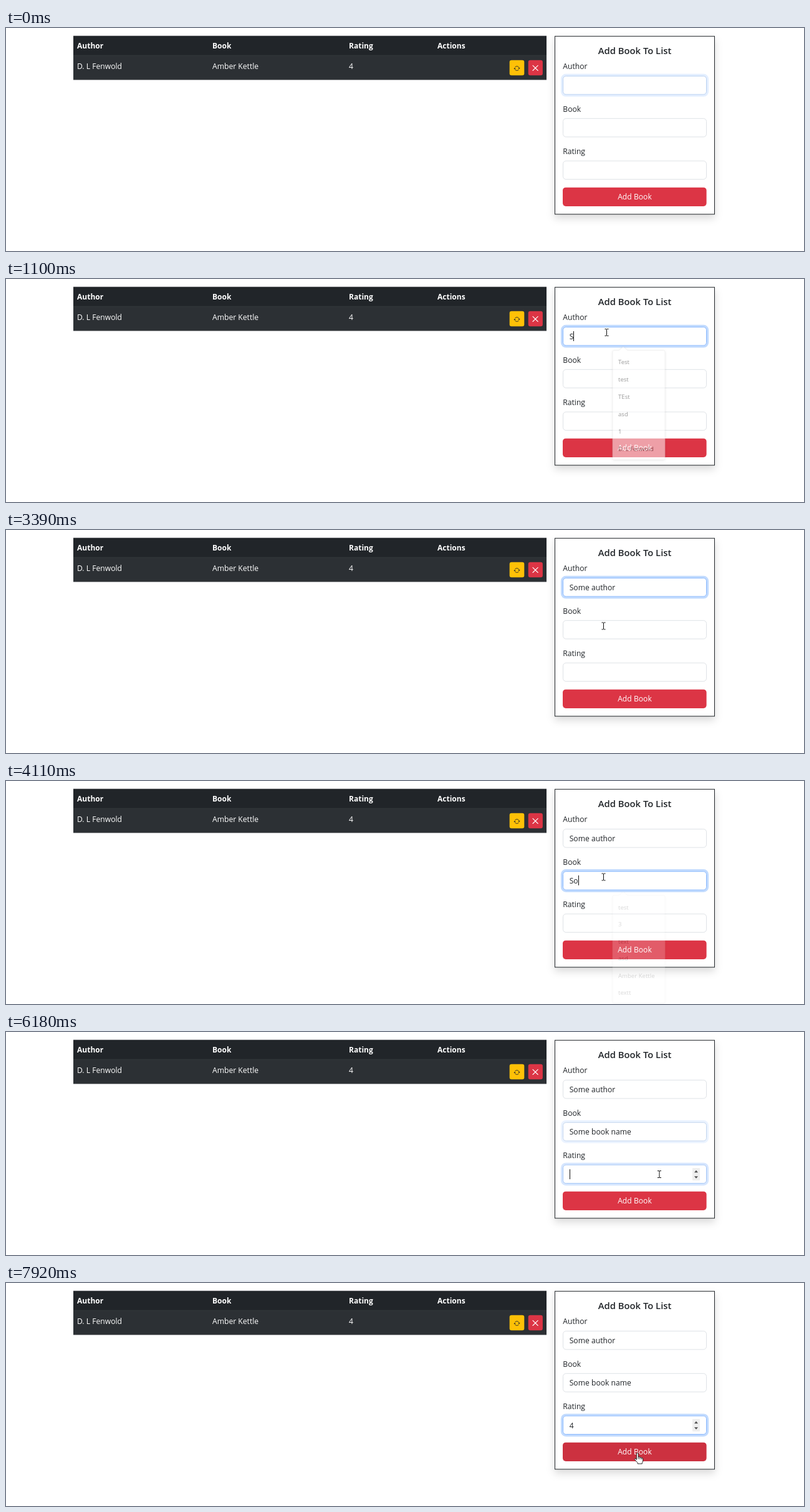
An HTML page for the animation above (7.99 s loop, 1280x359 px).

```html
<!DOCTYPE html>
<html lang="en">
<head>
<meta charset="utf-8">
<title>Book list</title>
<style>
  html, body { margin: 0; width: 100%; height: 100%; overflow: hidden; background: #fff; }
  svg { display: block; width: 100%; height: 100%; }
  text { font: 12.15px "Open Sans", "Noto Sans", sans-serif; fill: #212529; white-space: pre; }
  .table text, .btn-text { fill: #fff; }
  .table .head { font-weight: 700; font-size: 12px; }
  .title { font-weight: 600; font-size: 14.8px; }
  .middle { text-anchor: middle; }
  .card { fill: #fff; stroke: #212529; filter: drop-shadow(0 6.4px 6.4px rgba(0, 0, 0, .15)); }
  .ring { fill: none; stroke: #c2dbfe; stroke-width: 3.4; }
  .box { fill: #fff; }
  .popup text { font-size: 9.6px; fill: #444; }
  .popup path { fill: #fff; stroke: #ddd; stroke-width: .7; filter: drop-shadow(0 1px 2px rgba(0, 0, 0, .14)); }
</style>
</head>
<body>
<svg id="stage" viewBox="0 0 1280 359" xmlns="http://www.w3.org/2000/svg">
  <g class="table">
    <rect x="108" y="12.6" width="759" height="70.6" fill="#212529"/>
    <rect x="108" y="44" width="759" height="39.2" fill="#2c3034"/>
    <path d="M108 44.2H867M108 82.9H867" stroke="#373b3e" stroke-width=".8"/>
    <text class="head" x="114" y="33">Author</text>
    <text class="head" x="331" y="33">Book</text>
    <text class="head" x="550" y="33">Rating</text>
    <text class="head" x="692" y="33">Actions</text>
    <text x="114" y="66">D. L Fenwold</text>
    <text x="331" y="66">Amber Kettle</text>
    <text x="550" y="66">4</text>
    <rect x="807.7" y="51.7" width="23.6" height="24.6" rx="3.2" fill="#ffc107"/>
    <g fill="none" stroke="#212529" stroke-width=".9">
      <path d="M816.4 63.4a3.5 3.5 0 0 1 6.2 0M822.6 66.6a3.5 3.5 0 0 1-6.2 0"/>
    </g>
    <path d="M821.3 64h3.4l-1.7 2zM814.3 66h3.4l-1.7-2z" fill="#212529"/>
    <rect x="837.7" y="51.7" width="23.2" height="24.6" rx="3.2" fill="#dc3545"/>
    <path d="M845 60.3l8.2 8.2m0-8.2l-8.2 8.2" stroke="#fff" stroke-width="1.1" stroke-linecap="round"/>
  </g>

  <rect class="card" x="880.5" y="13.3" width="256" height="286.5"/>
  <text class="title middle" x="1008.5" y="42">Add Book To List</text>
  <g id="fields"></g>
  <g id="spinner">
    <rect x="1101" y="219" width="12" height="20" rx="1" fill="#efefef"/>
    <rect id="pressed" x="1101" y="219" width="12" height="11" fill="#777"/>
    <path d="M1104 226.2h6l-3-3.6zM1104 232.2h6l-3 3.6z" fill="#505050"/>
  </g>
  <rect id="button" x="893" y="256.7" width="230.6" height="30.2" rx="4.8"/>
  <text class="btn-text middle" x="1008.5" y="276.4">Add Book</text>
  <rect id="caret" width="1" height="16" fill="#111"/>
  <g id="popups"></g>

  <circle id="click" r="9.5" fill="#f8e800" fill-opacity=".62"/>
  <g id="cursor">
    <g id="beam" fill="none">
      <path d="M-3-5.5h2.2L0-5 .8-5.5H3M0-5V5M-3 5.5h2.2L0 5l.8.5H3" stroke="#fff" stroke-width="2.2" stroke-opacity=".7"/>
      <path d="M-3-5.5h2.2L0-5 .8-5.5H3M0-5V5M-3 5.5h2.2L0 5l.8.5H3" stroke="#111"/>
    </g>
    <path id="arrow" d="M.5.5v12.2l2.8-2.6 1.9 4.4 2-.9-1.9-4.2h3.9z" fill="#fff" stroke="#111" stroke-width=".9"/>
    <g id="hand" stroke="#111" stroke-width=".9" stroke-linejoin="round">
      <path d="M-1.4 9V1q0-1.4 1.4-1.4T1.4 1v5q2.6-.8 2.7.8 2.4-.7 2.6.9 2.2-.5 2.2 1.3v3.2q0 2-1.3 3.3V17H.4v-1.6L-4 10.7q-1.2-1.5.1-2 1.1-.4 2.5 1.7z" fill="#fff"/>
      <path d="M1.4 6v3.5M4.1 6.8v3M6.7 7.7v2.2" fill="none"/>
    </g>
  </g>
</svg>
<script>
const LOOP = 7990, FADE = 150;
const $ = id => document.getElementById(id);
const clamp = v => Math.max(0, Math.min(1, v));
const ramp = (t, start) => clamp((t - start) / FADE);
const mix = (a, b, k) => `rgb(${a.map((v, i) => Math.round(v + (b[i] - v) * k))})`;
const show = (el, on) => el.style.display = on ? '' : 'none';

function add(parent, tag, attrs, content = '') {
  const el = document.createElementNS('http://www.w3.org/2000/svg', tag);
  for (const name in attrs) el.setAttribute(name, attrs[name]);
  el.textContent = content;
  return parent.appendChild(el);
}

// keys: the moment at which each further character of the text appears
const fields = [
  { label: 'Author', y: 77.4, focus: 600, blur: 3460, text: 'Some author',
    keys: [1030, 1300, 1440, 1510, 1780, 1850, 1970, 2230, 2320, 2500, 2640] },
  { label: 'Book', y: 145.7, focus: 3460, blur: 6080, text: 'Some book name',
    keys: [3990, 4100, 4200, 4290, 4380, 4520, 4620, 4720, 4830, 4930, 5030, 5130, 5230, 5320] },
  { label: 'Rating', y: 214, focus: 6080, blur: Infinity, counter: true,
    keys: [6900, 7110, 7290, 7410] }
];

for (const f of fields) {
  const frame = { x: 893.5, y: f.y, width: 230, height: 29.6, rx: 4.8 };
  add($('fields'), 'text', { x: 893.3, y: f.y - 11.2 }, f.label);
  f.ring = add($('fields'), 'rect',
    { class: 'ring', x: 891.6, y: f.y - 1.9, width: 233.8, height: 33.4, rx: 6.6 });
  f.box = add($('fields'), 'rect', { class: 'box', ...frame });
  f.value = add($('fields'), 'text', { x: 903.7, y: f.y + 19.6 });
}

const popups = [
  { top: 115, step: 28, open: 680, close: 1030,
    items: ['Test', 'test', 'TEst', 'asd', '1', 'D. L Fenwold'] },
  { top: 184.3, step: 27.5, open: 3540, close: 3990,
    items: ['test', '3', 'text', 'asd', 'Amber Kettle', 'textt'] }
];

for (const p of popups) {
  p.el = add($('popups'), 'g', { class: 'popup' });
  add(p.el, 'path', { d: `M975 ${p.top}h8l7-6 7 6h58q2 0 2 2v${p.step * 6 + 4}q0 2-2 2h-80q-2 0-2-2V${p.top + 2}q0-2 2-2z` });
  p.items.forEach((item, i) =>
    add(p.el, 'text', { x: 982, y: p.top + 22.3 + i * p.step }, item));
}

// time, x, y and the pointer shape from then on
const path = [
  [140, 1197, 330, 'arrow'], [330, 1080, 205, 'arrow'], [490, 970, 98, 'beam'],
  [550, 963.5, 86, 'beam'], [3180, 963.5, 86, 'beam'], [3370, 958.5, 154.5, 'beam'],
  [5710, 958.5, 154.5, 'beam'], [5780, 975.5, 183, 'beam'], [5910, 1048, 229, 'beam'],
  [6420, 1048, 229, 'beam'], [6620, 1101, 227, 'arrow'], [6660, 1104.5, 225.5, 'arrow'],
  [7660, 1104.5, 225.5, 'arrow'], [7850, 1013, 274, 'hand'], [LOOP, 1012.5, 274, 'hand']
];
const clicks = [[580, 670], [3440, 3540], [6080, 6180],
  [6860, 6960], [7060, 7170], [7240, 7330], [7390, 7450]];

function drawPointer(t) {
  const next = path.findIndex(p => p[0] > t);
  show($('cursor'), next > 0);
  const pressed = clicks.some(([down, up]) => t >= down && t < up);
  show($('click'), pressed);
  show($('pressed'), pressed && t > 6800);
  if (next < 1) return;
  const [t0, x0, y0, shape] = path[next - 1], [t1, x1, y1] = path[next];
  const k = (t - t0) / (t1 - t0);
  const at = `translate(${x0 + (x1 - x0) * k} ${y0 + (y1 - y0) * k})`;
  $('cursor').setAttribute('transform', at);
  $('click').setAttribute('transform', at);
  for (const name of ['beam', 'arrow', 'hand']) show($(name), name === shape);
}

function drawFields(t) {
  show($('caret'), false);
  fields.forEach((f, i) => {
    const typed = f.keys.filter(k => k <= t).length;
    f.value.textContent = f.counter ? typed || '' : f.text.slice(0, typed);
    const fading = i === 0 ? 0.45 * clamp(1 - t / 70) : 0;
    const level = Math.max(fading, ramp(t, f.focus) - ramp(t, f.blur));
    f.ring.style.opacity = level;
    f.box.style.stroke = mix([222, 226, 230], [134, 183, 254], level);
    if (t < f.focus || t >= f.blur) return;
    const last = typed ? f.keys[typed - 1] : f.focus;
    show($('caret'), (t - last) % 1000 < 500);
    $('caret').setAttribute('x', Math.round(903.7 + (typed ? f.value.getComputedTextLength() : 0)));
    $('caret').setAttribute('y', Math.round(f.y + 6.6));
  });
}

function draw(now) {
  const t = now % LOOP;
  drawFields(t);
  for (const p of popups) p.el.style.opacity = clamp((t - p.open) / 80) * (1 - ramp(t, p.close));
  show($('spinner'), t >= 5880);
  $('button').style.fill = mix([220, 53, 69], [187, 45, 59], ramp(t, 7850));
  drawPointer(t);
}

const start = performance.now();
function tick() {
  draw(performance.now() - start);
  requestAnimationFrame(tick);
}
tick();
</script>
</body>
</html>
```
